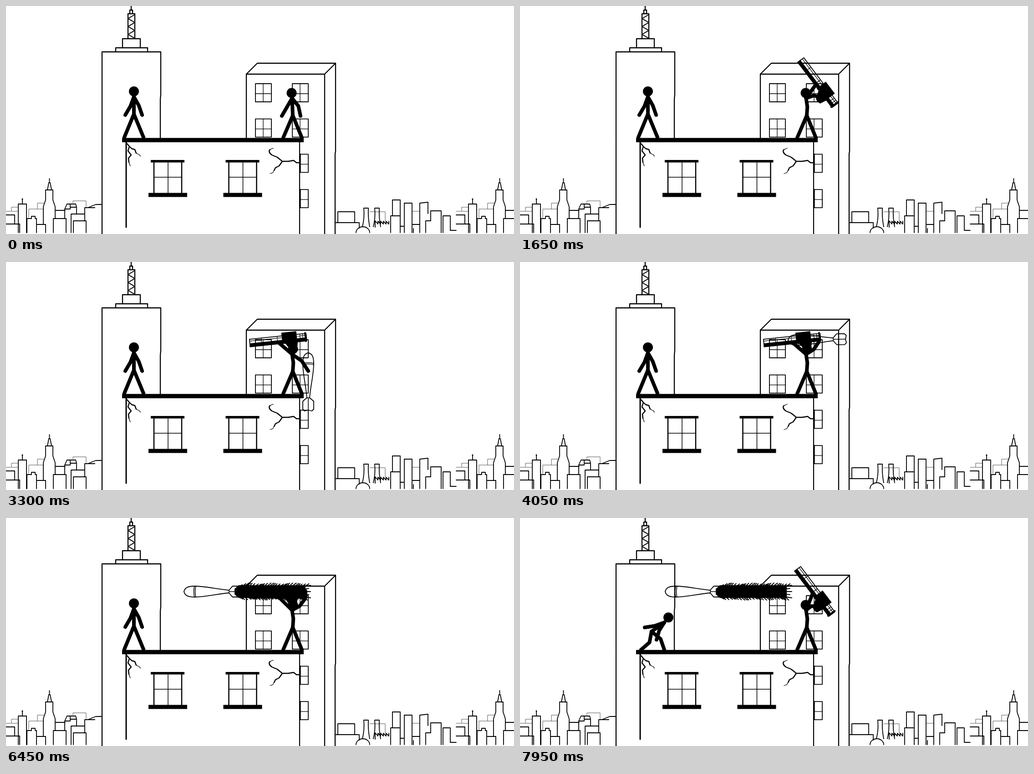
Animation, 1116 px wide and 502 px high, one loop 8000 ms. Source, as an HTML page with a canvas:

```html
<!DOCTYPE html>
<html lang="en">
<head>
<meta charset="utf-8">
<title>Rooftop standoff</title>
<style>
html, body { margin: 0; width: 100%; height: 100%; overflow: hidden; background: #fff; }
canvas { display: block; }
</style>
</head>
<body>
<canvas id="stage" width="1116" height="502"></canvas>
<script>
const LOOP = 8000, TICK = 150;
const ctx = document.getElementById('stage').getContext('2d');

// ---------- motion helpers ----------
const clamp = (v, lo = 0, hi = 1) => Math.min(hi, Math.max(lo, v));
const ramp = (t, from, to) => clamp((t - from) / (to - from));
const smooth = f => f * f * (3 - 2 * f);
const mix = (a, b, f) => a.map((v, i) => v + (b[i] - v) * f);

// Moves through [tick, pose] keys, holding the first and the last pose.
function track(t, ...keys) {
  return keys.reduce((pose, [end, next], i) =>
    i ? mix(pose, next, ramp(t, keys[i - 1][0], end)) : next, null);
}

// The picture advances on every tick at first and on fewer ones later.
function steppedTick(now) {
  const tick = Math.floor(now % LOOP / TICK);
  const pausing = [1, 10, 12, 24, 26, 29, 31, 33, 35, 37, 38, 40, 44, 46, 52];
  return pausing.includes(tick) ? tick - (tick === 38 ? 2 : 1) : tick;
}

// ---------- drawing helpers ----------
function stroke(path, width = 2, color = '#000') {
  ctx.lineWidth = width;
  ctx.strokeStyle = color;
  ctx.stroke(new Path2D(path));
}

function fillBox(x, y, w, h, color = '#000') {
  ctx.fillStyle = color;
  ctx.fillRect(x, y, w, h);
}

function dot(x, y, r) {
  ctx.fillStyle = '#000';
  ctx.beginPath();
  ctx.arc(x, y, r, 0, 7);
  ctx.fill();
}

// A limb whose joint sits `bend` pixels beside the middle.
function limb([x1, y1], [x2, y2], bend = 0) {
  const dx = x2 - x1, dy = y2 - y1, k = bend / Math.hypot(dx, dy);
  stroke(`M${x1} ${y1}L${(x1 + x2) / 2 + dy * k} ${(y1 + y2) / 2 - dx * k}L${x2} ${y2}`, 8);
}

function placed([x, y, degrees], draw) {
  ctx.save();
  ctx.translate(x, y);
  ctx.rotate(degrees * Math.PI / 180);
  draw();
  ctx.restore();
}

// ---------- scenery ----------
function skyline() {
  stroke('M0 452H26M12 451V443H26M50 466V447H82M69 447V434H83', 1, '#555');
  stroke('M0 460H19V480M0 480H30V499M27 499V436H45V499M36 436V426M46 499V468H56V463H64V468H67' +
    'M67 499V468M67 481H87V499M82 481V442L87 427V405H103V427L108 442V468' +
    'M91 405L94 389H97L100 405M95.5 389V380M104 499V468H132V499M108 450H130', 1.8);
  dot(36, 425, 1.6);
}

function distantCity() {
  for (const shift of [0, 989]) placed([shift, 0, 0], skyline);

  stroke('M147 434V429H176V443M799 453H833V474M892 452H909', 1, '#555');
  stroke('M129 468V447L134 436H153L155 443V458M129 447H141V437M141 443H155' +
    'M143 499V458H173V473M148 499V473H176V499M173 458V444H195M180 444L197 437H211', 1.8);

  let saw = 'M811 487V473';
  for (let x = 817; x < 846; x += 6) saw += `L${x} 480V474`;
  stroke(saw, 1.8);
  for (const x of [783, 807]) stroke(`M${x} 486q5 -20 3 -41h10q-1 21 3 41`, 1.8);
  stroke('M724 477H776V489M729 477V453H766V477M769 499A15 13 0 0 1 799 499' +
    'M845 499V462H866V499M849 462V427H866V462M866 485H875M875 499V434H892V499' +
    'M892 481H909M895 499V490M909 499V434L927 432V457M922 499V473H933V451H956V499' +
    'M960 499V462H976V494H989', 1.8);
}

function towers() {
  stroke('M211 502V101H340V195L339 205V291M241 101V92H311V101M256 92V72H295V92' +
    'M268 72V17H283V72M272 17V9H278V17M275 9V0', 2.3);
  let brace = 'M283 19';
  for (let i = 1; i < 7; i++) brace += `L${i % 2 ? 268 : 283} ${19 + i * 8.7}`;
  stroke(brace, 2);

  stroke('M528 291V150H700V502M528 150L552 126H724V320L723 325V502M700 150L724 126', 2.3);
  for (let row = 0; row < 4; row++) {
    const y = 171 + row * 77.7;
    for (const x of [548, 629]) {
      stroke(`M${x} ${y}h35v40h-35z`, 1.8);
      stroke(`M${x + 17} ${y}v40M${x} ${y + 22}h35`, 1.3);
    }
  }
}

function frontBuilding() {
  fillBox(264, 296, 381, 206, '#fff');
  stroke('M264 300V487', 3);
  stroke('M645 300V502M646.5 326V366M646.5 404V444', 2.2);
  for (const x of [313, 477.5]) {
    fillBox(x + 5, 339, 74, 5.5);
    stroke(`M${x + 12} 344V412M${x + 73} 344V412`, 2.5);
    stroke(`M${x + 43} 344V412M${x + 12} 377H${x + 73}`, 1.5);
    fillBox(x, 411.5, 85, 9);
  }
  stroke('M264 301L271 309L268 319L275 328L269 335L270 344M271 309L276 314L283 316L286 324', 2.4);
  stroke('M270 344L273 352M286 324L294 328L295 331', 1.3);
  stroke('M645 345L638 345L632 340L620 342L607 342L596 333L584 328Q575 321 580 316M607 342L600 352L592 356L589 362', 2.4);
  stroke('M580 316L587 313M589 362L586 367L580 369', 1.3);
}

// ---------- launcher, missile, flame ----------
const carried = 53;                     // launcher angle off the shoulder
const aimed = [623, 166, 0];
const loaded = [536, 162, 0];

// Centre of the launcher's block, and its angle.
function launcherPose(t) {
  const shouldered = [622, 167, -6];
  return track(t, [4, [563, 278, carried]], [9, [632, 184, carried]], [11, [671, 187, carried]],
    [17, shouldered], [27, shouldered], [28, aimed], [46, aimed], [51, [664, 180, carried]]);
}

// Stage position of a point u along the barrel from the muzzle and v below its top.
function onLauncher([x, y, degrees], u, v) {
  const a = degrees * Math.PI / 180, du = u - 88, dv = v - 6;
  return [x + du * Math.cos(a) - dv * Math.sin(a), y + du * Math.sin(a) + dv * Math.cos(a)];
}

function launcher() {
  ctx.translate(-88, -6);
  stroke('M1 0H126V16H1Z', 1.8);
  stroke('M1 4H126M27 0V10M62 0V10M112 0V16M118 0V16', 1.3);
  fillBox(0, 9, 126, 8.5);
  stroke('M124 -1V17', 4);
  fillBox(72, -7, 33, 25);
  ctx.fill(new Path2D('M78 17L87 31Q94 37 103 32L106 17Z'));
}

// Nose of the missile and its angle; after firing it slows to a stop in mid-air.
function missilePose(t) {
  const pose = track(t, [23, [664, 200, 90]], [25, [638, 180, 20]], [27, [589, 172, -1]], [28, loaded]);
  const flying = t - 40;
  if (flying > 0) pose[0] -= 37 + 36 * Math.min(flying, 3) + 18 * clamp(flying - 3, 0, 4);
  return pose;
}

function missile() {
  for (const side of [-1, 1]) {
    ctx.save();
    ctx.scale(1, side);
    stroke('M0 0C2 9 9 12 24 12C46 12 74 5 99 3L104 9L107 12H124L128 8L126 0', 1.8);
    ctx.restore();
  }
  stroke('M23 -12Q20 0 23 12M26 -12Q23 0 26 12M99 -3V3M99 0H127', 1.6);
}

// A tapering core with bristles swept back on both sides.
function flame(growth) {
  const half = 4.5 + 14.5 * growth, start = 111, tip = 253 + 25 * growth;
  const taper = Math.max(0, 0.95 - half / 20), last = tip - 11;
  const radius = x => {
    const s = (x - start) / (last - start);
    return half * Math.min(1, 0.72 + s * 2.5) * (1 - s * taper);
  };
  const core = half / 26, end = radius(last);
  const left = radius(start) * core, right = end * core, shoulder = half * core;
  ctx.fillStyle = '#000';
  ctx.fill(new Path2D(`M${start} ${-left * 0.6}L${start + 9} ${-shoulder}L${last} ${-right}` +
    `V${right}L${start + 9} ${shoulder}L${start} ${left * 0.6}Z`));

  let hairs = '';
  for (let x = start + 4, i = 0; x < last; x += 5.5, i++) {
    for (const side of [-1, 1]) {
      const r = radius(x) * (0.93 + 0.06 * Math.sin(i * 7 + side)) * side;
      hairs += `M${x} ${r * core * 0.8}L${x + 9 + 2 * Math.sin(i * 5 + side)} ${r}`;
    }
  }
  for (let k = -2; k <= 2; k++) {
    hairs += `M${last - 4} ${k * end * 0.3}L${tip - (k & 1) * 4} ${k * end * 0.36}`;
  }
  stroke(hairs, 2);
}

// ---------- figures ----------
function leftFigure(t) {
  const sink = ramp(t, 46, 51);
  const crouch = sink + 0.12 * (sink - ramp(t, 51, 53));
  const between = (standing, crouched) => mix(standing, crouched, crouch);
  const neck = between([281, 200], [317, 230]);
  const hip = between([281, 238], [289, 250]);
  dot(...between([281, 188], [326, 219]), 11);
  limb(neck, hip);
  limb(hip, between([260, 289], [266, 290]), 8 * crouch);
  limb(hip, between([302, 289], [317, 290]), 7 * crouch);
  limb(neck, between([262, 240], [274, 241]), 2);
  limb(neck, between([299, 240], [300, 268]), 2 - 5 * crouch);
}

function rightFigure(t, tube) {
  const hip = [630, 241];
  const stoop = smooth(ramp(t, 0, 4)) - smooth(ramp(t, 4, 9));
  const grab = ramp(t, 0, 4);
  const aiming = ramp(t, 11, 17) - ramp(t, 46, 51);
  const reaching = ramp(t, 19, 22) - ramp(t, 23, 25);

  const lean = 1.12 * stoop;
  const neck = [hip[0] - 1.5 - 39 * Math.sin(lean), hip[1] - 38 * Math.cos(lean)];
  const rear = mix(onLauncher(tube, 94, 22), onLauncher(tube, 121, 19), aiming);
  const front = mix([606, 242], onLauncher(tube, 64, 14), grab);
  const back = mix(mix([647, 242], rear, grab), [664, 240], reaching);

  dot(neck[0] - 1 + 3 * aiming, neck[1] - 11.5 - 2.5 * aiming * 0 + 0, 11);
  limb(neck, hip, 2 * grab);
  limb(hip, [609, 290]);
  limb(hip, [650, 290]);
  limb(neck, front);
  limb(neck, back, 5 - 9 * aiming * (1 - reaching));
}

// ---------- main ----------
function draw(now) {
  const t = steppedTick(now);
  const tube = launcherPose(t);

  fillBox(0, 0, 1116, 502, '#fff');
  ctx.lineCap = ctx.lineJoin = 'round';
  distantCity();
  towers();
  frontBuilding();
  leftFigure(t);
  rightFigure(t, tube);
  fillBox(255, 290.5, 399, 9.5);

  if (t >= 4) placed(tube, launcher);
  if (t >= 22) placed(missilePose(t), () => {
    missile();
    if (t >= 30) flame(ramp(t, 30, 39));
  });
  requestAnimationFrame(draw);
}
requestAnimationFrame(draw);
</script>
</body>
</html>
```
